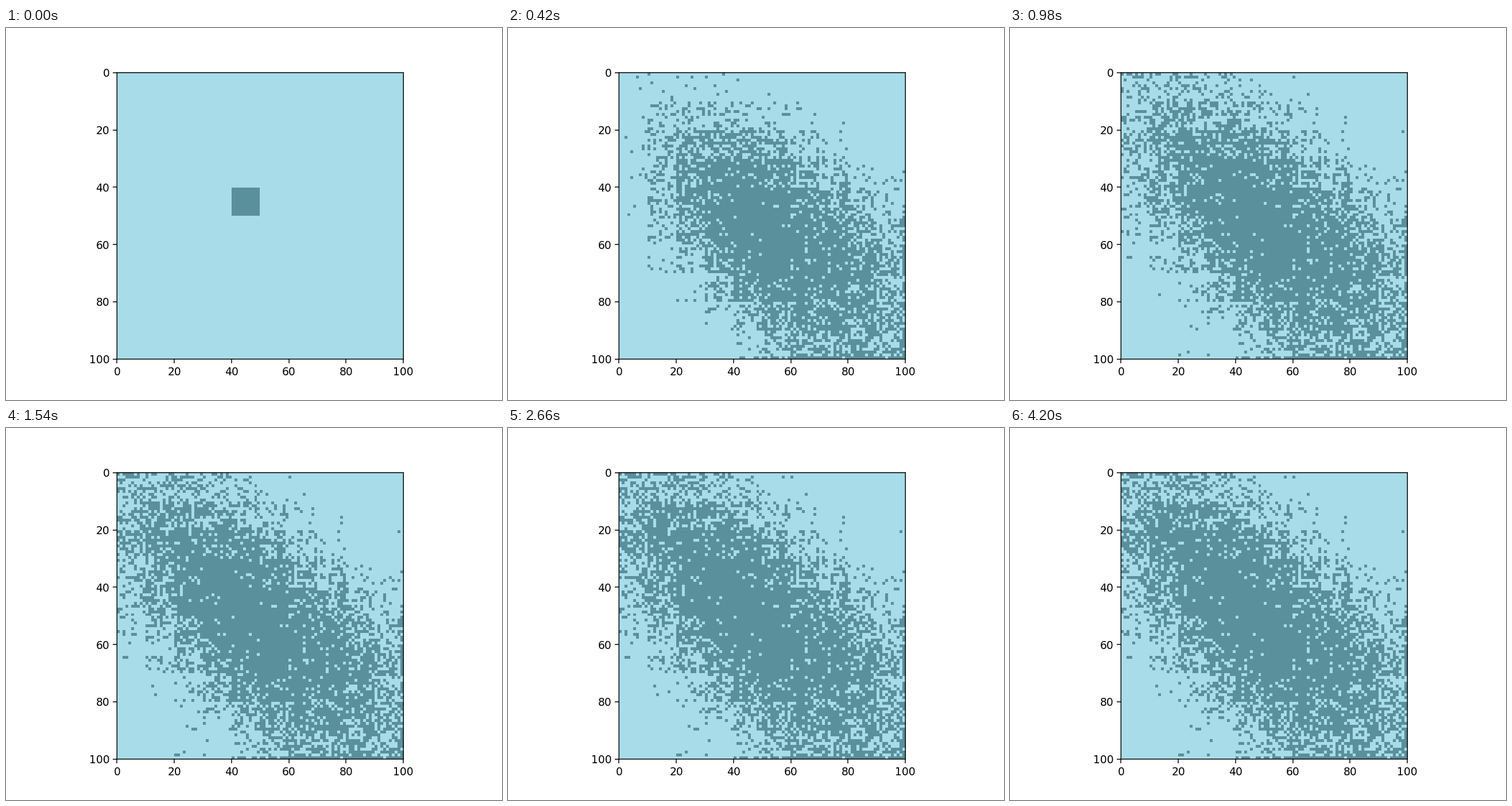
These frames come from a looping animation (864 px wide and 648 px high, 4.34 s). A matplotlib script:

```python
import numpy as np
import matplotlib.pyplot as plt
from matplotlib.animation import FuncAnimation
from matplotlib.colors import ListedColormap

SIZE, BLOCK = 100, 10
START = 4                       # block row and column of the first square
STEPS, STEP_MS = 31, 140

plt.rcParams["path.snap"] = False

y, x = np.mgrid[0:SIZE, 0:SIZE] // BLOCK


def settled_density():
    """Chance that a cell is filled at the end: an oval along the diagonal."""
    along = (x + y) / 2 - START
    across = (x - y + .25) * (1.15 - .05 * along)
    along = along * np.where(along < 0, 1.1, .85)
    return 1 / (1 + np.exp(1.2 * np.hypot(along, across) - 5))


def early_share():
    """Part of it filled by step 3: the spread is slow to the left and top."""
    share = np.clip((x - y + 8) / 5, 0, 1)
    for axis in (x, y):
        lag = np.maximum(START - axis, 0)
        share = share * (1 - (lag / 4.3) ** 2)
    return share


def pile_up(p):
    """Overshooting cells gather on the far edges."""
    p[-1] = 1 - (1 - p[-1]) ** 3
    p[:, -1] = 1 - (1 - p[:, -1]) ** 3
    return p


SETTLED = settled_density()
EARLY = SETTLED * early_share()
START_SQUARE = (x == START) & (y == START)
draw = np.random.default_rng(12).random((SIZE, SIZE))


def cells(step):
    if step < 3:
        reached = np.minimum(x, y) >= START - step
        p = EARLY * reached * (1 - .55 ** step)
    else:
        p = SETTLED + (EARLY - SETTLED) * np.exp(-(step - 3) / 4.5)
    return ((draw < pile_up(p)) | START_SQUARE).astype(int)


fig, ax = plt.subplots(figsize=(6.4, 4.8), dpi=135)
image = ax.imshow(cells(0), cmap=ListedColormap(["#a7dce8", "#5a8f9c"]),
                  vmin=0, vmax=1, interpolation="nearest",
                  extent=(0, SIZE, SIZE, 0))
ticks = range(0, SIZE + 1, 20)
ax.set(xticks=ticks, yticks=ticks)


def update(step):
    image.set_data(cells(step))
    return [image]


anim = FuncAnimation(fig, update, frames=STEPS, interval=STEP_MS,
                     init_func=lambda: update(0), repeat=True, repeat_delay=0)
plt.show()
```
